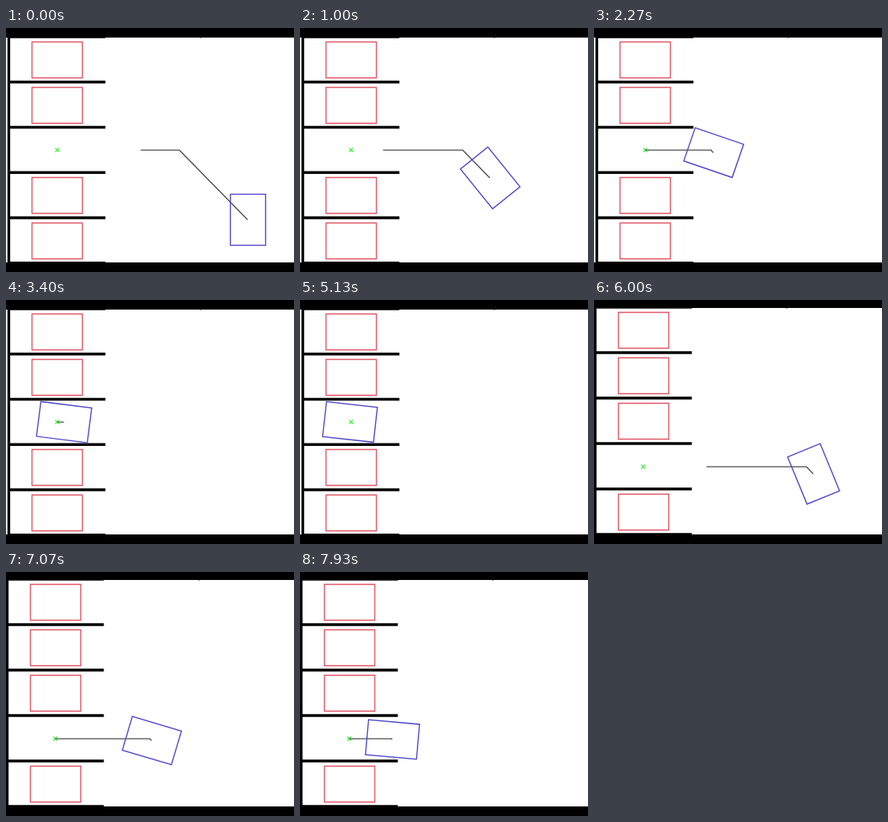
Recreate the animation shown at these times as an HTML page. Size 360x306 px, loop 8 s.

```html
<!DOCTYPE html>
<html lang="en">
<head>
<meta charset="utf-8">
<title>Parking planner</title>
<style>
  html, body { margin: 0; width: 100%; height: 100%; overflow: hidden; background: #000; }
  svg { display: block; width: 100vw; height: 100vh; }
  path, #car { fill: none; }
  .wall { stroke: #000; stroke-width: 3.4; }
  .parked { stroke: #e05664; stroke-width: 1.4; }
  .goal { stroke: #46f046; stroke-width: 1.4; }
  #route { stroke: #4a4a4a; stroke-width: 1.3; }
  #car { stroke: #5048cc; stroke-width: 1.4; }
</style>
</head>
<body>
<svg viewBox="0 0 360 306">
  <g id="lot"></g>
  <path id="route"/>
  <rect id="car" x="-32" y="-22" width="64" height="44"/>
</svg>
<script>
const LOOP = 8000, STEP = 200 / 3, REACH = 134;

// speed in px/s, drag in px/s², turn is the distance over which the car straightens
const scenes = [
  { begin: 0, left: 2, top: 12, pitch: 56.75, free: 2,
    goal: { x: 64, y: 153 }, from: { x: 302.5, y: 240.5 },
    lag: 0.07, speed: 69.6, drag: 0, turn: 105 },
  { begin: 5530, left: 0, top: 10, pitch: 57, free: 3,
    goal: { x: 61.5, y: 209 }, from: { x: 300.5, y: 238 },
    lag: 0.19, speed: 94.3, drag: 4.87, turn: 75.5 }
];

const lot = document.getElementById("lot");
const route = document.getElementById("route");
const car = document.getElementById("car");

function drawLot({ left, top, pitch, free, goal }) {
  let walls = `M${left + 1.5} ${top}V294`;
  let parked = "";
  for (let i = 0; i < 6; i++) {
    walls += `M${left} ${top - 1 + i * pitch}h122.3`;
    if (i < 5 && i !== free) {
      parked += `M${left + 30.5} ${top + 5.5 + Math.round(i * pitch)}h63v45h-63z`;
    }
  }
  lot.innerHTML = `
    <rect y="${top}" width="360" height="${294 - top}" fill="#fff"/>
    <rect x="${left + 240}" y="${top}" width="2" height="1" fill="#999"/>
    <path class="wall" d="${walls}"/>
    <path class="parked" d="${parked}"/>
    <path class="goal" d="M${goal.x - 2.5} ${goal.y - 2.5}l5 5m0 -5l-5 5"/>`;
}

// Never below zero, with a rounded corner
const softFloor = (d, w) => d > 20 * w ? d : w * Math.log(1 + Math.exp(d / w));
const fade = (d, length, power) => Math.exp(-Math.pow(d / length, power));

function pose({ from, goal, lag, speed, drag, turn }, sec) {
  const u = Math.max(0, sec - lag);
  const stop = goal.x - 1.5;
  const x = stop + softFloor(from.x - stop - u * (speed - drag * u), 7);
  const gone = Math.max(0, from.x - x);

  // The car swings onto the lane, then drifts down to its centre line
  const drift = px => 0.02 * (px - goal.x);
  const drop = from.y - goal.y - drift(from.x);
  return {
    x,
    y: goal.y + drift(x) + drop * fade(gone, 0.8 * drop, 1.64),
    angle: 90 * fade(gone, turn, 1.18)
  };
}

let shown = null;

function frame(now) {
  const t = Math.floor((now % LOOP + 4) / STEP) * STEP % LOOP;
  const scene = scenes[t + 4 < scenes[1].begin ? 0 : 1];
  if (scene !== shown) drawLot(shown = scene);

  const { x, y, angle } = pose(scene, Math.max(0, t - scene.begin) / 1000);
  const { goal } = scene;
  const end = Math.max(goal.x, x - REACH);
  const bend = Math.max(end, x - (y - goal.y) * 0.98);
  car.setAttribute("transform", `translate(${x} ${y}) rotate(${angle})`);
  route.setAttribute("d", x > goal.x ? `M${x - 0.5} ${y}L${bend} ${goal.y + 0.2}H${end}` : "");
  requestAnimationFrame(frame);
}
frame(performance.now());
</script>
</body>
</html>
```
